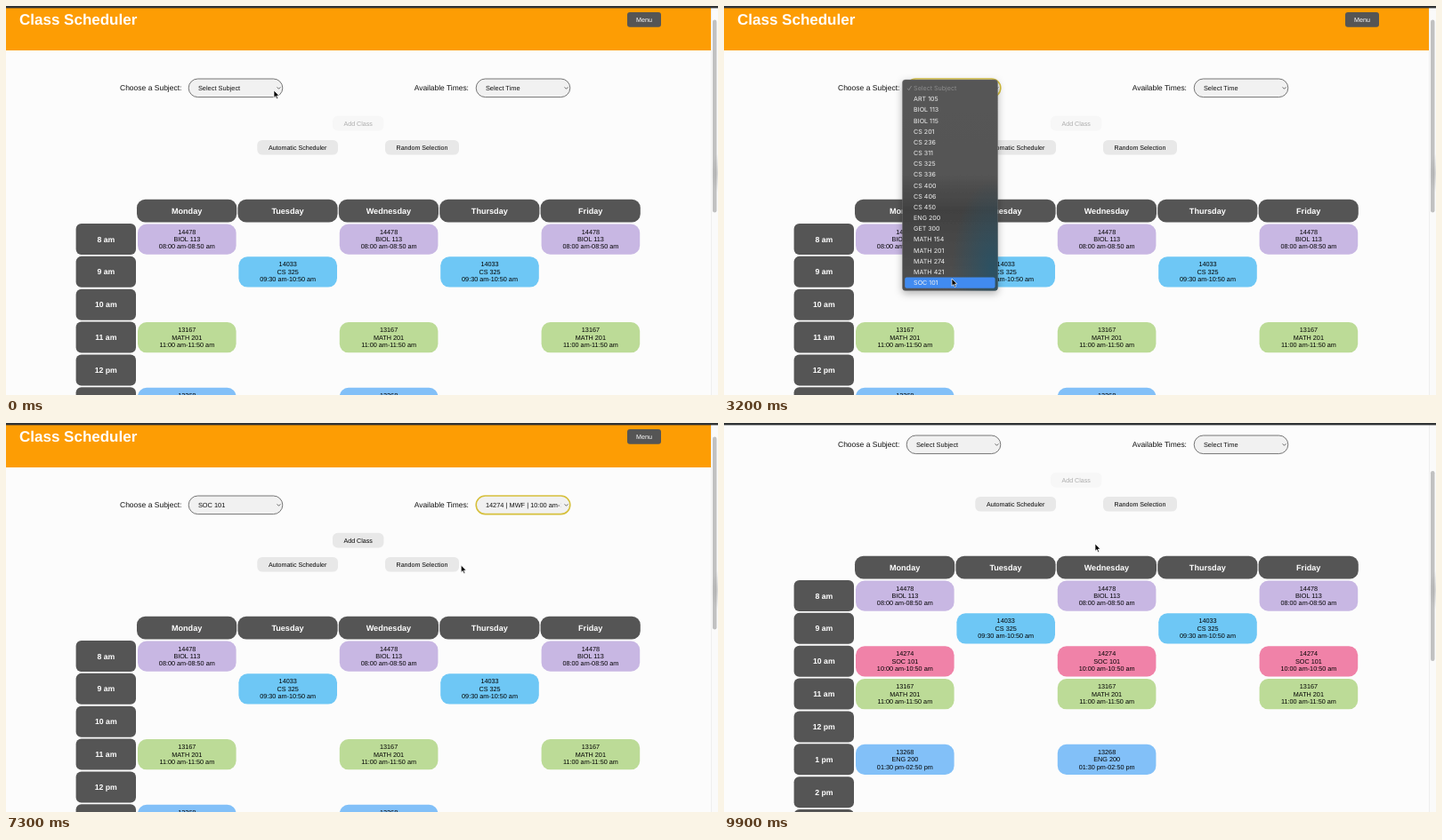
Write an HTML page that moves like this. It is 800x438 px and loops after 10000 ms.

```html
<!DOCTYPE html>
<html lang="en">
<head>
<meta charset="utf-8">
<title>Class Scheduler</title>
<style>
  html, body { margin: 0; width: 100%; height: 100%; overflow: hidden; background: #fcfcfc; }
  svg { display: block; width: 100vw; height: 100vh; }
  text { font-family: "Liberation Sans", Arial, sans-serif; text-rendering: geometricPrecision; white-space: pre; }
  .popup text { font-family: Inter, Roboto, sans-serif; }
</style>
</head>
<body>
<svg id="stage" viewBox="0 0 800 438" xmlns="http://www.w3.org/2000/svg"></svg>
<script>
const LOOP = 10000, STEP = 100;
const DARK = '#555';
const ROW_H = 36.87, COL_W = 113.4, OPTION_H = 12.17, OPTION_Y = 92.5;

const subjects = ['Select Subject', 'ART 105', 'BIOL 113', 'BIOL 115', 'CS 201', 'CS 236', 'CS 311',
  'CS 325', 'CS 336', 'CS 400', 'CS 406', 'CS 450', 'ENG 200', 'GET 300', 'MATH 154', 'MATH 201',
  'MATH 274', 'MATH 421', 'SOC 101'];
const times = ['13927 | ONLINE | TBA', '13903 | TR | 02:30 pm-03:50 pm', '13884 | ONLINE | TBA',
  '13882 | TR | 01:00 pm-02:20 pm', '14136 | ONLINE | TBA', '13883 | M | 05:00 pm-07:50 pm',
  '13911 | ONLINE | TBA', '14274 | MWF | 10:00 am-10:50 am', '14273 | ONLINE | TBA',
  '14272 | ONLINE | TBA', '13885 | ONLINE | TBA'];
const days = ['Monday', 'Tuesday', 'Wednesday', 'Thursday', 'Friday'];
const hours = ['8 am', '9 am', '10 am', '11 am', '12 pm', '1 pm', '2 pm', '3 pm'];

// Moments of interaction, in ms
const at = { subjectOpen: 300, subjectPick: 3500, timeOpen: 4900, timePick: 6900, added: 7900 };

// [time, x, y] of the pointer tip
const pointerKeys = [[0, 301, 95], [300, 301, 95], [1100, 274, 193], [3100, 256, 307], [3600, 256, 307],
  [4600, 602, 93], [5000, 602, 93], [5900, 587, 148], [6600, 582, 178], [7000, 582, 178],
  [7700, 417, 136], [LOOP, 417, 136]];
const scrollKeys = [[0, 22], [7900, 22], [8300, 0], [9050, 0], [9500, 52], [9900, 100], [LOOP, 112]];

function sample(keys, t) {
  const i = Math.max(1, keys.findIndex(key => key[0] > t));
  const [a, b] = [keys[i - 1], keys[i]];
  const u = (t - a[0]) / (b[0] - a[0]);
  return a.slice(1).map((v, k) => v + (b[k + 1] - v) * u);
}

const rect = (x, y, w, h, r, fill, extra = '') =>
  `<rect x="${x}" y="${y}" width="${w}" height="${h}" rx="${r}" fill="${fill}" ${extra}/>`;
const text = (x, y, size, str, fill = '#000', extra = '') =>
  `<text x="${x}" y="${y}" font-size="${size}" fill="${fill}" ${extra}>${str}</text>`;
const MID = 'text-anchor="middle"', BOLD = 'font-weight="700"';

function selectBox(id, x) {
  return rect(x, 114, 105.6, 20.6, 10.3, '#f1f1f1', `id="${id}Box" stroke="${DARK}" stroke-width=".8"`) +
    `<clipPath id="${id}Clip"><rect x="${x + 8}" y="114" width="87" height="21"/></clipPath>` +
    text(x + 10.7, 127, 7.4, '', '#111', `id="${id}Text" clip-path="url(#${id}Clip)"`) +
    `<path d="M${x + 99.4} 123.4l1.9 1.9 1.9-1.9" fill="none" stroke="#444" stroke-width=".8"/>`;
}

function button(x, y, w, label, id = '') {
  return `<g id="${id}">` + rect(x, y, w, 16.6, 5.5, '#e8e8e8') +
    text(x + w / 2, y + 10.9, 7.1, label, '#000', MID) + '</g>';
}

function course(columns, row, fill, lines) {
  const cy = 294.5 + row * ROW_H;
  return columns.map(c => {
    const x = 148 + c * COL_W;
    return rect(x, cy - 17, 110.6, 34.2, 10, fill) +
      lines.map((s, i) => text(x + 55.3, cy + (i - 1) * 8.4 + 2.5, 7.26, s, '#000', MID)).join('');
  }).join('');
}

function popup(id, x, w, options, fill, shade) {
  const bottom = OPTION_Y + (options.length - 1) * OPTION_H + 9;
  const h = bottom - 83;
  return `<g id="${id}Popup" class="popup">` +
    rect(x, 83, w, h, 3.5, fill, 'filter="url(#shadow)" stroke="#777" stroke-width=".4"') +
    rect(x, 83, w, h, 3.5, shade) +
    rect(x + 2.8, 0, w - 5.8, 12.2, 2, '#418bf0', `id="${id}Hover"`) +
    options.map((s, i) => text(x + 12.7, OPTION_Y + i * OPTION_H + 2.6, 7.1, s,
      s.startsWith('Select') ? '#8c8c8c' : '#f2f2f2')).join('') +
    `<path d="M${x + 5.8} 92.8l1.5 2 2.9-4.8" fill="none" stroke="${id === 'subject' ? '#8c8c8c' : '#f2f2f2'}" stroke-width=".9"/></g>`;
}

const MWF = [0, 2, 4];
document.getElementById('stage').innerHTML = `
  <defs>
    <filter id="shadow" x="-30%" y="-20%" width="160%" height="140%">
      <feDropShadow dx="0" dy="3" stdDeviation="4" flood-opacity=".3"/>
    </filter>
    <linearGradient id="subjectFill" x2="0" y2="1">
      <stop offset="0" stop-color="#575757"/><stop offset=".45" stop-color="#545454"/>
      <stop offset=".62" stop-color="#414141"/><stop offset=".78" stop-color="#484848"/>
      <stop offset="1" stop-color="#515151"/>
    </linearGradient>
    <linearGradient id="timeFill" x2="0" y2="1">
      <stop offset="0" stop-color="#575757"/><stop offset=".75" stop-color="#555"/>
      <stop offset="1" stop-color="#474747"/>
    </linearGradient>
    <radialGradient id="blueGlow" cx=".94" cy=".9" r=".42">
      <stop offset="0" stop-color="#20536b" stop-opacity=".75"/>
      <stop offset="1" stop-color="#20536b" stop-opacity="0"/>
    </radialGradient>
    <radialGradient id="edgeGlow" cx="1">
      <stop offset="0" stop-color="#777" stop-opacity=".28"/><stop offset="1" stop-color="#777" stop-opacity="0"/>
    </radialGradient>
  </defs>
  ${rect(0, 0, 800, 438, 0, '#fcfcfc')}
  <g id="header">
    ${rect(0, -40, 792, 112, 0, '#fd9d04')}
    ${text(15, 43.2, 17, 'Class Scheduler', '#fff', BOLD)}
    ${rect(698, 29, 38, 16.7, 3, DARK)}
    ${text(717, 39.9, 7.2, 'Menu', '#fff', MID)}
  </g>
  <g id="content">
    ${text(396, 80, 8.5, 'Course successfully added', '#000', MID + ' id="message"')}
    ${text(128, 127, 8.5, 'Choose a Subject:', '#111')}
    ${selectBox('subject', 205.2)}
    ${text(458.7, 127, 8.45, 'Available Times:', '#111')}
    ${selectBox('time', 528.2)}
    ${button(367, 155.8, 57.4, 'Add Class', 'add')}
    ${button(282.3, 183, 90.7, 'Automatic Scheduler')}
    ${button(426, 183, 83, 'Random Selection')}
    ${days.map((d, i) => rect(147 + i * COL_W, 249.8, 112.2, 25.8, 9.5, DARK) +
      text(203.1 + i * COL_W, 265.6, 9.1, d, '#fff', BOLD + MID.padStart(21))).join('')}
    ${hours.map((h, i) => rect(78.6, 277 + i * ROW_H, 67.4, 35, 6, DARK) +
      text(112.3, 297.6 + i * ROW_H, 8.7, h, '#fff', BOLD + MID.padStart(21))).join('')}
    ${course(MWF, 0, '#c8b7e3', ['14478', 'BIOL 113', '08:00 am-08:50 am'])}
    ${course([1, 3], 1, '#6ec7f5', ['14033', 'CS 325', '09:30 am-10:50 am'])}
    <g id="newCourse">${course(MWF, 2, '#f082a8', ['14274', 'SOC 101', '10:00 am-10:50 am'])}</g>
    ${course(MWF, 3, '#bcdb97', ['13167', 'MATH 201', '11:00 am-11:50 am'])}
    ${course([0, 2], 5, '#82c0f8', ['13268', 'ENG 200', '01:30 pm-02:50 pm'])}
  </g>
  ${rect(792, 0, 8, 438, 0, '#fafafa')}
  ${rect(792, 0, .6, 438, 0, '#e6e6e6')}
  ${rect(794, 0, 4.5, 214, 2.25, '#c1c1c1', 'id="thumb"')}
  ${rect(785, 166, 15, 44, 0, 'url(#edgeGlow)')}
  ${rect(797.5, 170, 6, 36.5, 2, '#111', 'id="edgeTab"')}
  ${rect(0, 0, 800, 2.4, 0, '#2e3133')}
  ${popup('subject', 200.4, 107.2, subjects, 'url(#subjectFill)', 'url(#blueGlow)')}
  ${popup('time', 523.4, 138.6, times, 'url(#timeFill)', 'none')}
  <path id="pointer" d="M0 0v8.2l1.9-1.7 1.4 3 1.3-.6-1.3-2.9h2.6z" fill="#000" stroke="#fff" stroke-width=".7"/>`;

const el = Object.fromEntries([...document.querySelectorAll('#stage [id]')].map(n => [n.id, n]));
const show = (node, on) => node.setAttribute('visibility', on ? 'visible' : 'hidden');
const move = (node, x, y) => node.setAttribute('transform', `translate(${x} ${y})`);

function updatePopup(id, open, y, first, count) {
  const index = Math.round((y - OPTION_Y) / OPTION_H);
  show(el[id + 'Popup'], open);
  show(el[id + 'Hover'], open && index >= first && index < count);
  el[id + 'Hover'].setAttribute('y', OPTION_Y - 6.1 + index * OPTION_H);
}

function focusRing(box, on) {
  box.setAttribute('stroke', on ? '#d6c03c' : DARK);
  box.setAttribute('stroke-width', on ? 1.6 : .8);
}

function render(t) {
  const [x, y] = sample(pointerKeys, t);
  const [scroll] = sample(scrollKeys, t);
  const added = t >= at.added;
  const picked = t >= at.subjectPick && !added;

  move(el.header, 0, -scroll);
  move(el.content, 0, -scroll - (added ? 0 : 10));
  move(el.pointer, x, y);
  el.thumb.setAttribute('y', 4.5 + scroll * .495);
  el.thumb.setAttribute('height', added ? 214 : 217);
  show(el.message, added);
  show(el.newCourse, added);
  show(el.edgeTab, t >= 4200 && t < 7200);

  el.subjectText.textContent = picked ? 'SOC 101' : subjects[0];
  el.timeText.textContent = !picked ? 'Select Time' : times[t < at.timePick ? 0 : 7];
  const [addBox, addLabel] = el.add.children;
  addBox.setAttribute('fill', picked ? '#e8e8e8' : '#f7f7f7');
  addLabel.setAttribute('fill', picked ? '#000' : '#ababab');

  focusRing(el.subjectBox, t >= at.subjectOpen && t < at.timeOpen);
  focusRing(el.timeBox, t >= at.timeOpen && !added);
  updatePopup('subject', t >= at.subjectOpen && t < at.subjectPick, y, 1, subjects.length);
  updatePopup('time', t >= at.timeOpen && t < at.timePick, y, 0, times.length);
}

const start = performance.now();
function tick() {
  const t = (performance.now() - start) % LOOP;
  render(Math.floor(t / STEP) * STEP);
  requestAnimationFrame(tick);
}
tick();
</script>
</body>
</html>
```
